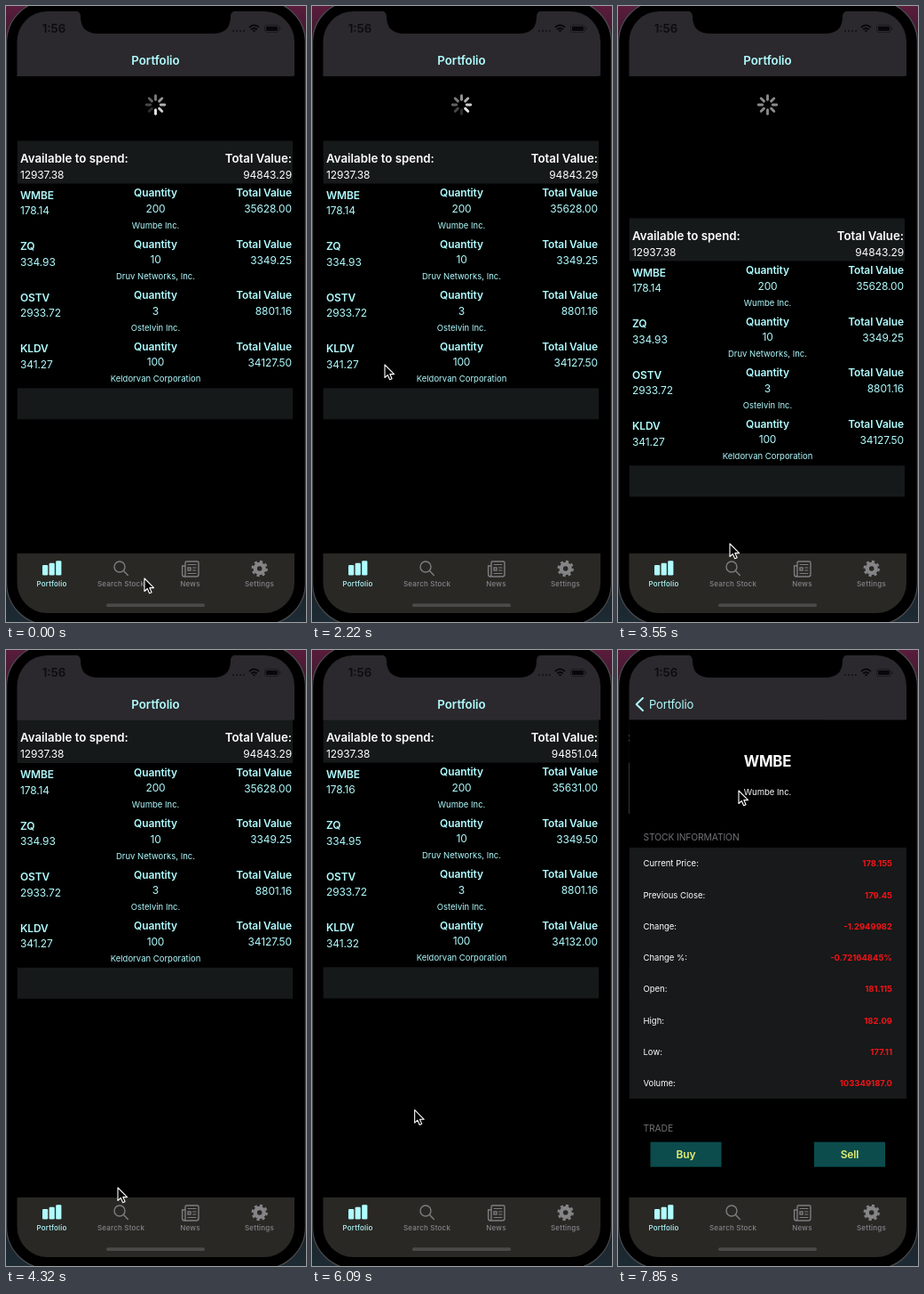
Write an HTML page that moves like this. It is 338 px wide and 692 px high and loops after 7990 ms.

```html
<!DOCTYPE html>
<html lang="en">
<head>
<meta charset="utf-8">
<title>Portfolio</title>
<style>
  html, body { margin: 0; width: 100%; height: 100%; overflow: hidden; background: #000; }
  svg { display: block; width: 100vw; height: 100vh; }
  text { font: 12px Inter, "Open Sans", sans-serif; fill: #fff; letter-spacing: -.01em; white-space: pre; }
  .head { font-size: 13.3px; font-weight: 600; letter-spacing: 0; }
  .bold { font-weight: 600; }
  .cyan { fill: #b0fcff; }
  .small { font-size: 9.5px; letter-spacing: 0; }
  .section { font-size: 10.3px; fill: #717176; }
  .red { font-weight: 700; fill: #f01418; }
  .tab { font-size: 8px; font-weight: 500; letter-spacing: .2px; fill: #85858a; }
  .tab.cyan { fill: #b0fcff; }
  .symbol { font-size: 16.8px; font-weight: 700; }
  .button { font-weight: 600; fill: #e3ee73; }
  .hint { fill: #000; }
</style>
</head>
<body>
<svg viewBox="0 0 338 692" preserveAspectRatio="none">
  <defs>
    <linearGradient id="desk" x2="0" y2="1">
      <stop stop-color="#5a1c3c"/><stop offset=".1" stop-color="#241a20"/>
      <stop offset=".9" stop-color="#1c1e22"/><stop offset="1" stop-color="#1d2b34"/>
    </linearGradient>
    <clipPath id="screen"><rect x="12.5" y="6" width="312.5" height="676" rx="34"/></clipPath>
    <clipPath id="content"><rect x="12" y="78.5" width="314" height="536.5"/></clipPath>
  </defs>
  <rect width="338" height="692" fill="url(#desk)"/>
  <rect x=".6" y="-6" width="336.8" height="701" rx="47" fill="#000" stroke="#4a4b4f" stroke-width="1.2"/>

  <g clip-path="url(#screen)">
    <rect x="12" y="6" width="314" height="72.5" fill="#2b292d"/>
    <rect x="12" y="615" width="314" height="68" fill="#292824"/>
    <path d="M12 78.3H326" stroke="#3a393c" stroke-width=".6"/>
    <g clip-path="url(#content)">
      <g id="list">
        <g id="bands"></g>
        <g id="refresh"></g>
        <g id="rows"></g>
      </g>
      <g id="detail"><rect x="10" y="78" width="318" height="538"/></g>
    </g>
    <g id="title"></g>
    <g id="back"><path d="M28 54L20.7 61L28 68" fill="none" stroke="#b0fcff" stroke-width="2" stroke-linecap="round" stroke-linejoin="round"/></g>
  </g>

  <path d="M78 5.5Q84 6 84 12Q84 31 104 31H233Q253 31 253 12Q253 6 259 5.5Z"/>
  <g id="status">
    <path d="M255 28h2m2 0h2m2 0h2m2 0h2" stroke="#111" stroke-width="1.6"/>
    <g fill="none" stroke="#08080a" stroke-width="1.9">
      <path d="M274 24Q279.5 18.8 285 24M276.2 26.5Q279.5 23.6 282.8 26.5"/>
      <rect x="291.5" y="21.5" width="16" height="8" rx="2.5" stroke="#1a1a1c" stroke-width="1"/>
    </g>
    <path d="M277.8 27.8Q279.5 26.4 281.2 27.8L279.5 29.7Z" fill="#08080a"/>
    <rect x="293" y="23" width="13" height="5" rx="1.2" fill="#08080a"/>
    <path d="M308.8 24v3" stroke="#1a1a1c"/>
  </g>

  <g id="tabs">
    <g fill="#b0fcff">
      <rect x="41" y="628" width="6.2" height="11.5" rx="1.3"/>
      <rect x="48.6" y="625.8" width="6.2" height="13.7" rx="1.3"/>
      <rect x="56.2" y="623.2" width="6.2" height="16.3" rx="1.3"/>
    </g>
    <g fill="none" stroke="#7d7d80" stroke-width="1.4" stroke-linecap="round">
      <circle cx="128" cy="630" r="6"/><path d="M132.5 634.5L137.3 639.6"/>
      <path d="M202 638V625.5Q202 624 203.5 624H215.5Q217 624 217 625.5V638.5Q217 641 214.5 641H201Q198.6 641 198.6 638.5V629H202V638Q202 641 200.5 641"/>
      <path d="M205 627.5H214M210.5 631H214M210.5 634H214M205 637.5H214" stroke-width="1.1"/>
      <rect x="205" y="631" width="3" height="3"/>
    </g>
    <circle cx="285.7" cy="632" r="5" fill="none" stroke="#858588" stroke-width="4.4"/>
    <circle cx="285.7" cy="632" r="8" fill="none" stroke="#858588" stroke-width="2.4" stroke-dasharray="3.2 3.083"/>
  </g>
  <rect x="113" y="671.3" width="111" height="3.8" rx="1.9" fill="#4b4a49"/>

  <path id="cursor" d="M0 0V14.5L3.3 11.5L5.6 16.8L8.1 15.7L5.8 10.6H10.6Z" fill="#000" stroke="#fff" stroke-width="1.1" stroke-linejoin="round"/>
</svg>
<script>
const LOOP = 7990, STEPS = 54;
const MID = 168.5;
const ROW = 57.5;
const RELOAD_STEP = 36, SELECT_STEP = 49;

// [step, pull distance]
const PULL = [
  [0, 73], [2, 73], [3, 62], [4, 35], [5, 12], [6, 3], [7, 0],
  [11, 0], [12, 40], [13, 95], [14, 110], [15, 73], [16, 62], [17, 30], [18, 5.5], [19, 0],
  [21, 0], [22, 70], [23, 130], [24, 160], [25, 110], [26, 73], [27, 60], [28, 15], [29, .5], [30, 0],
  [31, 0], [32, 30], [33, 110], [34, 155], [35, 90], [36, 73], [37, 40], [38, 12], [39, 3], [40, 0]
];
// [step, x, y]
const POINTER = [
  [0, 156, 643], [2, 150, 620], [7, 44, 180], [9, 38, 167], [11, 38, 167], [14, 82, 403], [18, 82, 403],
  [20, 85, 185], [21, 86, 180], [24, 126, 604], [29, 126, 604], [31, 110, 180], [34, 122, 586],
  [40, 122, 586], [46, 84, 170], [48, 82, 160], [49, 82, 160], [53, 136, 158]
];
const PUSH = [[49, 0], [50, .25], [51, .7], [52, .95], [53, 1]];

// symbol, company, quantity, [price, total] before and after the reload
const STOCKS = [
  ['WMBE', 'Wumbe Inc.', '200', ['178.14', '35628.00'], ['178.16', '35631.00']],
  ['ZQ', 'Druv Networks, Inc.', '10', ['334.93', '3349.25'], ['334.95', '3349.50']],
  ['OSTV', 'Ostelvin Inc.', '3', ['2933.72', '8801.16'], ['2933.72', '8801.16']],
  ['KLDV', 'Keldorvan Corporation', '100', ['341.27', '34127.50'], ['341.32', '34132.00']]
];
const TOTALS = ['94843.29', '94851.04'];
const FACTS = [
  ['Current Price:', '178.155'], ['Previous Close:', '179.45'], ['Change:', '-1.2949982'],
  ['Change %:', '-0.72164845%'], ['Open:', '181.115'], ['High:', '182.09'],
  ['Low:', '177.11'], ['Volume:', '103349187.0']
];

const $ = id => document.getElementById(id);
const clamp = v => Math.max(0, Math.min(1, v));

function add(parent, tag, attrs) {
  const node = document.createElementNS('http://www.w3.org/2000/svg', tag);
  for (const key in attrs) node.setAttribute(key, attrs[key]);
  return parent.appendChild(node);
}

function label(parent, x, y, string, style = '', anchor = 'start') {
  const node = add(parent, 'text', { x, y, class: style, 'text-anchor': anchor });
  node.textContent = string;
  return node;
}

const box = (parent, x, y, width, height, fill) => add(parent, 'rect', { x, y, width, height, fill });

function sample(table, step) {
  const next = table.findIndex(key => key[0] >= step);
  if (next < 0) return table[table.length - 1].slice(1);
  if (next === 0) return table[0].slice(1);
  const a = table[next - 1], b = table[next];
  const k = (step - a[0]) / (b[0] - a[0]);
  return a.slice(1).map((v, i) => v + (b[i + 1] - v) * k);
}

const shift = (node, x, y) => node.setAttribute('transform', `translate(${x} ${y})`);

// Portfolio list
const bands = $('bands'), rows = $('rows');
box(bands, 12.5, 78.5, 313, 48, '#16191a');
box(bands, 12.5, 356.3, 313, 35, '#16191a');
const highlight = box(bands, 12.5, 126.5, 313, ROW, '#d1d1d6');
label(rows, 16, 102.6, 'Available to spend:', 'head');
label(rows, 322, 102.6, 'Total Value:', 'head', 'end');
label(rows, 16, 120.6, '12937.38');
const grandTotal = label(rows, 322, 120.6, '', '', 'end');
const cells = STOCKS.map(([symbol, company, quantity], i) => {
  const row = add(rows, 'g', { transform: `translate(0 ${i * ROW})` });
  label(row, 16, 143.6, symbol, 'bold cyan');
  label(row, MID, 141.4, 'Quantity', 'bold cyan', 'middle');
  label(row, 322, 141.4, 'Total Value', 'bold cyan', 'end');
  label(row, MID, 158.8, quantity, 'cyan', 'middle');
  label(row, MID, 176.6, company, 'small cyan', 'middle');
  return [label(row, 16, 161.2, '', 'cyan'), label(row, 322, 159.3, '', 'cyan', 'end')];
});

// Refresh control
const refresh = $('refresh');
label(refresh, MID, 134.6, 'Pull to refresh', 'small hint', 'middle');
const petals = Array.from({ length: 8 }, (_, i) => add(refresh, 'path', {
  d: 'M0 -5.8V-10.3', stroke: '#e4e4e6', 'stroke-width': 2.9, 'stroke-linecap': 'round',
  transform: `translate(${MID} 111) rotate(${i * 45})`
}));

// Stock detail
const detail = $('detail');
label(detail, MID, 131, STOCKS[0][0], 'symbol', 'middle');
label(detail, MID, 163.4, STOCKS[0][1], 'small', 'middle');
label(detail, 28.5, 214.3, 'STOCK INFORMATION', 'section');
box(detail, 12.5, 222, 313, 282, '#17191a');
FACTS.forEach(([name, value], i) => {
  const y = 243.3 + i * 35.25;
  label(detail, 28.5, y, name, 'small');
  label(detail, 309, y, value, 'small red', 'end');
});
label(detail, 28.5, 541.3, 'TRADE', 'section');
[['Buy', 36.5], ['Sell', 221]].forEach(([name, x]) => {
  box(detail, x, 552.7, 80, 28, '#0c4c4d');
  label(detail, x + 40, 571.2, name, 'button', 'middle');
});

// Bars
label($('title'), MID, 65.7, 'Portfolio', 'head cyan', 'middle');
label($('back'), 35, 65.7, 'Portfolio', 'cyan').style.fontSize = '13px';
label($('status'), 54, 30, '1:56', 'head', 'middle').style.fill = '#0c0c0e';
['Portfolio', 'Search Stock', 'News', 'Settings'].forEach((name, i) =>
  label($('tabs'), 51.5 + i * 78, 651.7, name, i ? 'tab' : 'tab cyan', 'middle'));

function drawRefresh(step, time, pull) {
  const pulling = step > 0 && pull > sample(PULL, step - 1)[0];
  const head = Math.floor(time / 125) + (step < 8 ? 4 : 2);
  refresh.setAttribute('opacity', clamp((pull - .5) / 6));
  petals.forEach((petal, i) => {
    const age = (head - i + STEPS * 8) % 8;
    petal.setAttribute('opacity', pulling ? .6 * clamp(pull / 11 - i) : 1 - age * .115);
  });
}

function draw(step) {
  const [pull] = sample(PULL, step), [push] = sample(PUSH, step);
  const [x, y] = sample(POINTER, step);
  const state = step >= RELOAD_STEP ? 1 : 0;

  shift(bands, 0, pull);
  shift(rows, 0, pull);
  drawRefresh(step, step * LOOP / STEPS, pull);
  grandTotal.textContent = TOTALS[state];
  cells.forEach((pair, i) => pair.forEach((node, j) => node.textContent = STOCKS[i][3 + state][j]));
  highlight.setAttribute('visibility', step >= SELECT_STEP ? 'visible' : 'hidden');

  shift($('list'), -94 * push, 0);
  shift(detail, 313 * (1 - push), 0);
  shift($('title'), -107 * push, 0);
  $('title').setAttribute('opacity', 1 - push);
  shift($('back'), 60 * (1 - push), 0);
  $('back').setAttribute('opacity', push);
  shift($('cursor'), x, y);
}

const start = performance.now();
function tick() {
  const time = (performance.now() - start) % LOOP;
  draw(Math.min(STEPS - 1, Math.floor((time + 15) / LOOP * STEPS)));
  requestAnimationFrame(tick);
}
tick();
</script>
</body>
</html>
```
